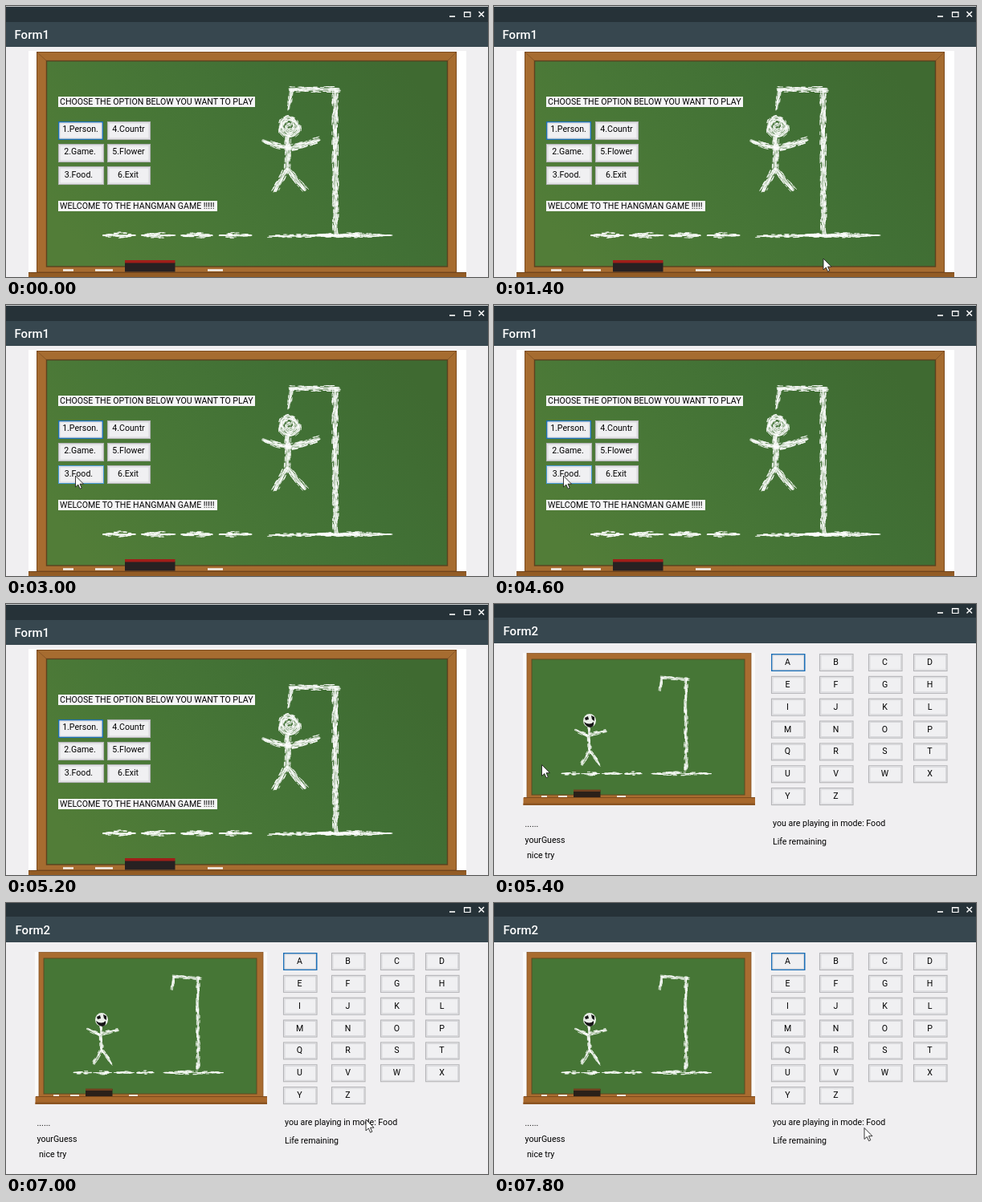
Animation of 600x338 px, one loop 8 s. Source, as an HTML page:

```html
<!DOCTYPE html>
<html lang="en">
<head>
<meta charset="utf-8">
<title>Hangman</title>
<style>
  html, body { margin: 0; width: 100%; height: 100%; overflow: hidden; background: #f0eff1; }
  svg { display: block; width: 100%; height: 100%; }
  text { font: 10.6px Roboto, sans-serif; fill: #000; white-space: pre; }
  .title { font-size: 15px; font-weight: 500; fill: #fff; }
  .mid { text-anchor: middle; }
  .chalk { fill: none; stroke: #fff; stroke-linecap: round; stroke-linejoin: round; }
</style>
</head>
<body>
<svg id="stage" viewBox="0 0 600 338">
  <defs>
    <linearGradient id="green" x1="0" y1=".7" x2="1" y2=".3">
      <stop offset="0" stop-color="#527d38"/>
      <stop offset=".35" stop-color="#487737"/>
      <stop offset=".7" stop-color="#417035"/>
      <stop offset="1" stop-color="#3f6a31"/>
    </linearGradient>
  </defs>
  <g id="menu"></g>
  <g id="game"></g>
  <path id="cursor" d="M0 0V14L3.3 11L5.6 16.2L7.8 15.2L5.5 10.2H10Z" fill="#fff" stroke="#222" stroke-width=".9"/>
</svg>
<script>
const get = id => document.getElementById(id);
const menu = get('menu'), game = get('game'), cursor = get('cursor');

let seed = 11;
const random = () => (seed = (seed * 16807) % 2147483647) / 2147483647;

function add(parent, tag, attrs, content = '') {
  const node = document.createElementNS('http://www.w3.org/2000/svg', tag);
  for (const key in attrs) node.setAttribute(key, attrs[key]);
  node.textContent = content;
  parent.append(node);
  return node;
}

// Boxes are given by their left, top, right and bottom edges.
const box = (parent, x, y, right, bottom, fill, more = {}) =>
  add(parent, 'rect', { x, y, width: right - x, height: bottom - y, fill, ...more });

const line = (parent, d, stroke, width = 1) =>
  add(parent, 'path', { d, stroke, 'stroke-width': width, fill: 'none' });

const label = (parent, x, y, content, cls = '') =>
  add(parent, 'text', { x, y, class: cls }, content);

function button(parent, x, y, right, bottom, textX, textY, content, focused) {
  const rim = focused ? .8 : .5;
  const rect = box(parent, x + rim, y + rim, right - rim, bottom - rim, '#f0f0f2',
    { stroke: focused ? '#1c70b8' : '#b4b4b7', 'stroke-width': focused ? 1.6 : 1.1 });
  box(parent, x + 2, y + 2, right - 2, bottom - 2, 'none', { stroke: '#d6d6d9', 'stroke-width': 1 });
  label(parent, textX, textY, content, 'mid');
  return rect;
}

// Rough stroke: a soft core under many short grains scattered around it.
function chalk(parent, points, width, taper = false) {
  let grains = '';
  points.slice(1).forEach(([bx, by], i) => {
    const [ax, ay] = points[i];
    const length = Math.hypot(bx - ax, by - ay), dx = (bx - ax) / length, dy = (by - ay) / length;
    const count = Math.ceil(length * width * .2);
    for (let k = 0; k < count; k++) {
      const u = random(), spread = taper ? Math.sin(Math.PI * u) : 1;
      const off = (random() - .5) * width * spread, half = Math.min(1 + random() * 2, length / 3);
      const x = ax + dx * u * length - dy * off, y = ay + dy * u * length + dx * off;
      grains += `M${(x - dx * half).toFixed(1)} ${(y - dy * half).toFixed(1)}L${(x + dx * half).toFixed(1)} ${(y + dy * half).toFixed(1)}`;
    }
  });
  const core = width * (taper ? .22 : .5);
  add(parent, 'path', { class: 'chalk', d: 'M' + points.join('L'), 'stroke-width': core, opacity: .65 });
  add(parent, 'path', { class: 'chalk', d: grains, 'stroke-width': .9, opacity: .9 });
}

// Inward spiral with an uneven radius.
const scribble = (cx, cy, r, turns) => Array.from({ length: turns * 12 }, (_, i) => {
  const angle = i * Math.PI / 6, radius = r * (1 - i / (turns * 12)) ** .8 + random() * 1.5;
  return [cx + radius * Math.cos(angle), cy + radius * Math.sin(angle)];
});

function windowBar(parent, title, x, baseline, split, bottom, iconY) {
  box(parent, 0, 0, 600, split, '#263238');
  box(parent, 0, split, 600, bottom, '#37474f');
  label(parent, x, baseline, title, 'title');
  line(parent, `M552 ${iconY + 6}h7`, '#fff', 1.6);
  line(parent, `M570.5 ${iconY + .5}h7.5v6h-7.5zM570 ${iconY + 1}h8`, '#fff', 1.2);
  line(parent, `M588.5 ${iconY}l6.5 6.5m0 -6.5l-6.5 6.5`, '#fff', 1.5);
}

function buildMenu() {
  const g = menu;
  box(g, 0, 0, 600, 338, '#f0eff1');
  box(g, 28, 56, 573, 338, '#fff');
  windowBar(g, 'Form1', 10.5, 41, 20, 51, 7);
  box(g, 0, 0, 600, 1, '#c9cccd');

  box(g, 38.5, 57.5, 560.5, 332, '#a66c30', { stroke: '#7d4c20' });
  line(g, 'M39 58L50 68M560 58L550 68', '#8a5728');
  box(g, 50.5, 68.5, 549.5, 325, 'url(#green)', { stroke: '#5b421f', 'stroke-width': 1.4 });
  box(g, 28, 332, 573, 338, '#935c25');
  line(g, 'M28 332.5H573', '#70441c');
  line(g, 'M71 329.5h13M111 329.5h22M251 329.5h19', '#f5f1ec', 2.6);
  box(g, 148, 320, 210.5, 331.5, '#272122');
  box(g, 148, 317, 210.5, 320.5, '#a01f19');

  chalk(g, [[354, 104], [414, 104]], 7);
  chalk(g, [[355, 106], [352, 128]], 5);
  chalk(g, [[409.5, 106], [410.5, 282]], 8);
  chalk(g, [[328, 287], [400, 286.5], [440, 286]], 4);
  chalk(g, [[380, 286], [478, 286]], 7, true);
  for (const x of [121, 170, 218, 267]) chalk(g, [[x, 286], [x + 38, 286]], 8, true);
  chalk(g, scribble(352.5, 149.5, 13, 3), 5);
  chalk(g, [[351, 165], [350, 203]], 8);
  chalk(g, [[349, 177], [336, 174], [320, 168]], 7);
  chalk(g, [[351, 178], [370, 173], [389, 167]], 8);
  chalk(g, [[349, 204], [335, 230]], 8);
  chalk(g, [[351, 204], [372, 229]], 8);

  box(g, 65, 113, 310, 126, '#f5f5f6');
  label(g, 67, 123, 'CHOOSE THE OPTION BELOW YOU WANT TO PLAY');
  box(g, 65, 243, 263, 256, '#f5f5f6');
  label(g, 67, 253, 'WELCOME TO THE HANGMAN GAME !!!!!');

  button(g, 65, 144, 121, 167, 92.5, 156.5, '1.Person.', true);
  button(g, 65, 172, 122, 195, 92, 185, '2.Game.');
  const food = button(g, 65, 200, 122, 223, 90.5, 214, '3.Food.');
  button(g, 126, 144, 180, 167, 152.5, 157, '4.Countr');
  button(g, 126, 172, 180, 195, 152.5, 185, '5.Flower');
  button(g, 126, 200, 180, 223, 152, 214, '6.Exit');
  return food;
}

function buildGame() {
  const g = game;
  box(g, 0, 0, 600, 338, '#f0eff1');
  windowBar(g, 'Form2', 11.5, 39, 17, 49, 5);

  box(g, 36, 61, 325, 251, '#fafafa');
  box(g, 41, 61.5, 320, 242, '#a96c30', { stroke: '#8a5626', 'stroke-width': .8 });
  box(g, 47, 69, 312, 238, '#467636', { stroke: '#5d4a20', 'stroke-width': 1 });
  box(g, 36.5, 241.5, 325, 251, '#a8682c');
  box(g, 36.5, 248.5, 325, 251, '#8b5422');
  line(g, 'M37 241.5H325', '#7d4a1c');
  line(g, 'M59 240h7M80 240h11M153 240h11', '#efe6da', 1.8);
  box(g, 99, 232, 132.5, 241, '#2b2019');
  box(g, 99, 231.5, 132.5, 234, '#70401f');

  chalk(g, [[207, 108], [208, 92], [241, 94]], 4);
  chalk(g, [[239, 94], [239, 206]], 4.5);
  chalk(g, [[196, 211.5], [270, 211.5]], 5, true);
  for (const x of [86, 111, 137, 163]) chalk(g, [[x, 211.5], [x + 20, 211.5]], 5, true);
  chalk(g, [[118, 153], [119, 184]], 4.5);
  chalk(g, [[101, 157], [117, 164]], 4.5);
  chalk(g, [[119, 163], [139, 158]], 4.5);
  chalk(g, [[119, 183], [109, 200]], 4.5);
  chalk(g, [[119, 183], [131, 200]], 4.5);
  add(g, 'ellipse', { cx: 119, cy: 145.5, rx: 8, ry: 8.5, fill: '#e9eee7' });
  add(g, 'path', { d: 'M113 142l4-2l1 4l-4 1zM121 139l4 2v5l-3-2zM112 147q7 5 12 0q1 6-4 7q-6-1-8-7z', fill: '#151515' });

  const columns = [345, 405, 466, 522];
  [...'ABCDEFGHIJKLMNOPQRSTUVWXYZ'].forEach((letter, i) => {
    const x = columns[i % 4], y = 62 + Math.floor(i / 4) * 27.85;
    button(g, x, y, x + 42.5, y + 22, x + 20.5, y + 14, letter, i === 0);
  });
  label(g, 38.5, 278, '......');
  label(g, 38.5, 298, 'yourGuess');
  label(g, 41, 317, 'nice try');
  label(g, 347, 277, 'you are playing in mode: Food');
  label(g, 347, 300, 'Life remaining');
}

const food = buildMenu();
buildGame();

const LOOP = 8000, STEP = 200;
// [time, x, y]; a time alone hides the pointer.
const pointer = [
  [0],
  [1400, 410, 315], [1800, 250, 245], [2000, 200.5, 224.5], [2400, 205, 213],
  [2800, 125, 213], [3000, 86.5, 213], [4800, 86.5, 213],
  [5000],
  [5400, 59.5, 200.5], [5600, 49, 206], [5800, 72, 212], [6200, 135, 227.5],
  [6400, 230, 262], [6600, 340, 286], [6800, 434, 275],
  [7000, 448, 270], [7400, 475, 272], [7800, 461, 280.5], [8000, 461, 280.5]
];

function pointerAt(t) {
  const i = pointer.findLastIndex(key => key[0] <= t);
  const [start, x, y] = pointer[i], [end, nextX = x, nextY = y] = pointer[i + 1];
  const u = (t - start) / (end - start);
  return x === undefined ? null : [x + (nextX - x) * u, y + (nextY - y) * u];
}

function draw(now) {
  const t = Math.floor((now % LOOP) / STEP) * STEP;
  game.style.display = t >= 5400 ? '' : 'none';
  const hovered = t >= 2800 && t < 5000;
  food.setAttribute('stroke', hovered ? '#4a9ad8' : '#b4b4b7');
  const at = pointerAt(t);
  cursor.style.display = at ? '' : 'none';
  if (at) cursor.setAttribute('transform', `translate(${at})`);
}

const origin = performance.now();
function tick() {
  draw(performance.now() - origin);
  requestAnimationFrame(tick);
}
tick();
</script>
</body>
</html>
```
